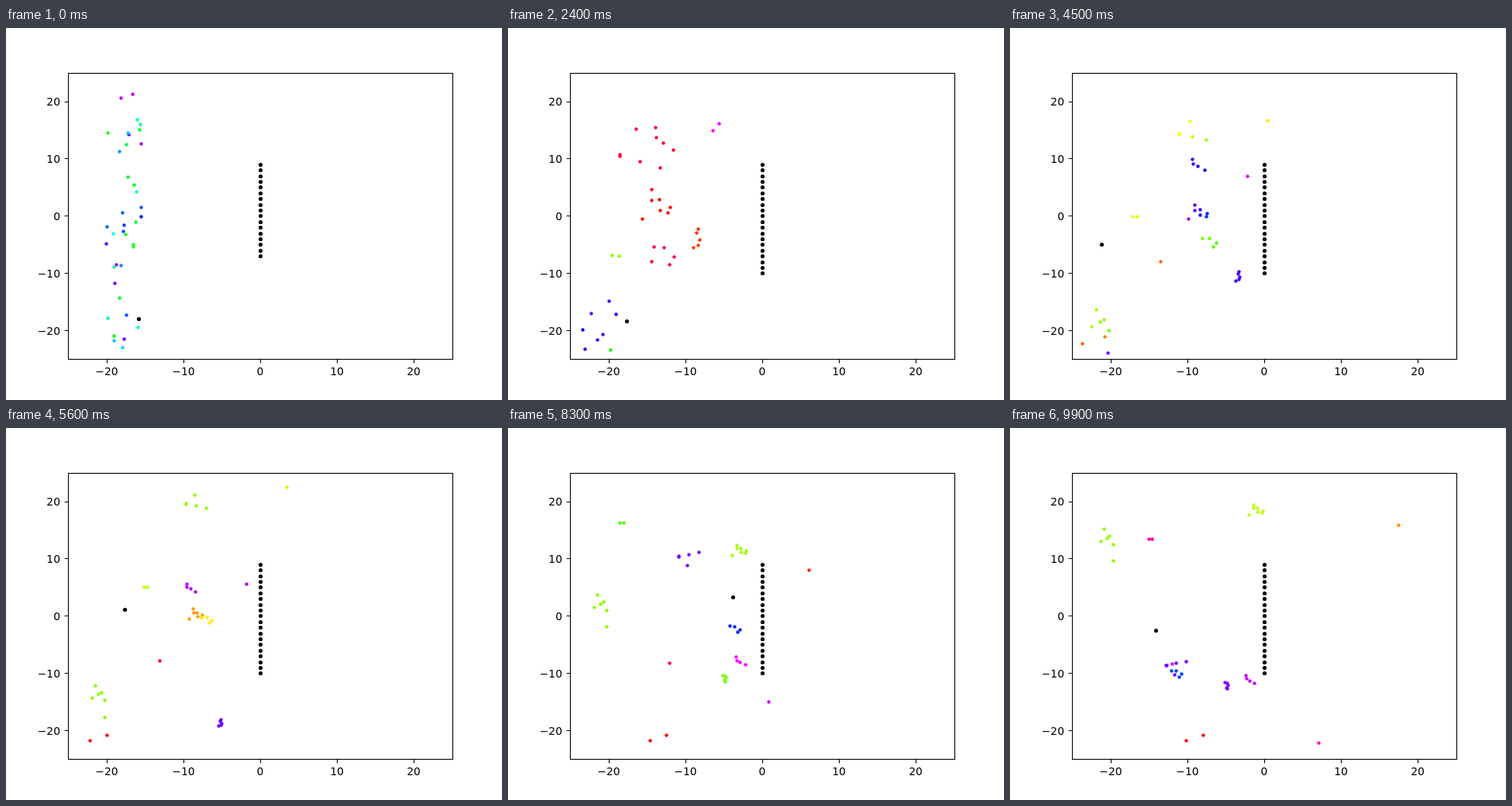
Animation, 640 px wide and 480 px high, one loop 10 s. Source, as an HTML page:

```html
<!DOCTYPE html>
<html lang="en">
<head>
<meta charset="utf-8">
<title>Flock</title>
<style>
html, body { margin: 0; width: 100%; height: 100%; overflow: hidden; background: #fff; }
svg { display: block; }
text { font: 13.89px "DejaVu Sans", sans-serif; }
.axis { fill: none; stroke: #000; stroke-width: 1.11; }
</style>
</head>
<body>
<svg id="plot" width="640" height="480" viewBox="0 0 640 480"></svg>
<script>
const plot = document.getElementById('plot');
const STEPS = 100, STEP_MS = 100, GATHER = 14, TIGHT = 56;

// Data units to pixels, centred on whole pixels
const toX = x => 328 + 9.92 * x, toY = y => 242.4 - 7.392 * y;
const snap = v => Math.round(v) + 0.5;

function add(tag, attrs, text = '') {
  const el = document.createElementNS('http://www.w3.org/2000/svg', tag);
  for (const name in attrs) el.setAttribute(name, attrs[name]);
  el.textContent = text;
  return plot.appendChild(el);
}
const dot = r => add('circle', { r });
function move(el, [x, y]) {
  el.setAttribute('cx', snap(toX(x)));
  el.setAttribute('cy', snap(toY(y)));
}

// Axes
add('rect', { class: 'axis', x: 80.5, y: 58.5, width: 496, height: 369 });
for (let v = -20; v <= 20; v += 10) {
  const x = toX(v), y = toY(v);
  const label = String(v).replace('-', '\u2212');
  add('path', { class: 'axis', d: `M${snap(x)} 427.5v4.9M80.5 ${snap(y)}h-4.9` });
  add('text', { x: Math.round(x), y: 448, 'text-anchor': 'middle' }, label);
  add('text', { x: 70, y: Math.round(y + 5.3), 'text-anchor': 'end' }, label);
}

let seed = 11;
function random() {
  seed = (seed * 16807) % 2147483647;
  return seed / 2147483647;
}
const spread = r => (random() * 2 - 1) * r;
const mix = (a, b, w) => a + (b - a) * w;
function smooth(u) {
  u = Math.min(1, Math.max(0, u));
  return u * u * (3 - 2 * u);
}
// Mirror at the walls, so a path that runs past one bounces back
function bounce(v) {
  const wall = 24, m = (((v + wall) % (4 * wall)) + 4 * wall) % (4 * wall);
  return m < 2 * wall ? m - wall : 3 * wall - m;
}

// Smooth curve through key points; a shorter list starts at a later time
const times = [0, GATHER, 34, TIGHT, 71, 83, 99];
function along(points, t) {
  const at = times.slice(-points.length), last = at.length - 1;
  t = Math.max(t, at[0]);
  let k = 0;
  while (k < last - 1 && at[k + 1] <= t) k++;
  const h = at[k + 1] - at[k], u = (t - at[k]) / h, w = smooth(u);
  return [0, 1].map(axis => {
    const slope = i => {
      const a = Math.max(0, i - 1), b = Math.min(last, i + 1);
      return (points[b][axis] - points[a][axis]) / (at[b] - at[a]);
    };
    return mix(points[k][axis], points[k + 1][axis], w)
      + h * u * (1 - u) * (slope(k) * (1 - u) - slope(k + 1) * u);
  });
}

// A flock shares one path; its birds start scattered and close up on it
const birds = [];
function flock(count, width, height, ...path) {
  for (let i = 0; i < count; i++) {
    const bird = { path, dx: spread(width), dy: spread(height), el: dot(2.2) };
    const course = (195 + spread(90)) * Math.PI / 180;
    bird.vx = 0.6 * Math.cos(course);
    bird.vy = 0.6 * Math.sin(course);
    bird.home = [-17.8 + spread(2.3), inFlock(bird, GATHER)[1] + spread(6)];
    birds.push(bird);
  }
}
function inFlock({ path, dx, dy }, t) {
  const [x, y] = along(path, t);
  const loose = path.length && dx ? mix(3.2, 1, smooth((t - GATHER) / (TIGHT - GATHER))) : 1;
  return [x + dx * Math.min(loose, 2), y + dy * loose];
}
function place(bird, t) {
  const [x, y] = inFlock(bird, t), w = smooth(t / GATHER);
  return [
    bounce(mix(bird.home[0] + bird.vx * t, x, w)),
    bounce(mix(bird.home[1] + bird.vy * t, y, w)),
  ];
}

flock(6, 1, 4, [-20.8, -20.8], [-21.3, -22], [-20.9, -13.8], [-20.9, -5], [-20.9, 2], [-20.3, 13.5]);
flock(2, 1.8, 0.8, [-18, -16], [-21.2, -21.8], [-20.4, -21.5], [-16.3, -21.5], [-12.9, -21.5], [-8.4, -21.5]);
flock(5, 0.4, 0.8, [-16, -6], [-3.6, -4.6], [-5.4, -18.8], [-5.1, -29.2], [-5.1, -37.3], [-5.1, -36]);
flock(5, 1.6, 1.4, [-21, 13], [-11.8, 11.6], [-8.4, 20], [-10.2, 30.5], [-9.6, 38], [-11.5, 57]);
flock(4, 0.9, 1, [-18.5, 15], [-9, 11.7], [-9.2, 5], [-4.8, -6], [-3, -7.8], [-2, -11]);
flock(7, 1.1, 1.2, [-19, 3], [-9, 2.5], [-8.2, 0.6], [-2.8, 7], [-2.8, 11.8], [-0.9, 18.8]);
flock(4, 0.8, 1.6, [-19, -4], [-8, -7], [-7, -0.4], [-1.6, 2.6], [-3.6, -2], [-11.5, -9.8]);
flock(2, 0.5, 0.2, [-19.5, -9], [-19, -4.7], [-15.1, 5], [-14.8, 12], [-18.5, 16.2], [-15, 13.4]);
flock(1, 0, 0, [-8.1, 20.4], [-3, 13.7], [3.4, 22.5], [3.8, 34.2], [6, 40], [17.4, 32.1]);
flock(1, 0, 0, [-15, -7.8], [-13.9, -8], [-13.1, -7.8], [-12.5, -8.2], [-12.1, -8.2], [-12, -8.4]);
flock(1, 0, 0, [-10.2, 21.7], [-3.4, 9.4], [-1.8, 5.6], [-1.6, 2.4], [0.8, -15], [7.1, -22.1]);

const barrier = Array.from({ length: 20 }, (_, i) => {
  const el = dot(2.6);
  move(el, [0, 9 - i]);
  return el;
});
const hunter = dot(2.6);
const hunt = [[-15.8, -18], [-12.9, -22.5], [-22, -12.1], [-17.6, 1.2], [-8.3, 2.6], [-3.8, 3.3], [-14.1, -2.5]];

function draw(step) {
  for (const bird of birds) {
    move(bird.el, place(bird, step));
    // The hue is the heading
    const [xa, ya] = place(bird, step - 0.1), [xb, yb] = place(bird, step + 0.1);
    const hue = Math.atan2(yb - ya, xb - xa) * 180 / Math.PI;
    bird.el.setAttribute('fill', `hsl(${(hue + 360) % 360}, 100%, 50%)`);
  }
  move(hunter, along(hunt, step));
  barrier.forEach((el, i) => el.setAttribute('visibility', i < 17 + step ? 'visible' : 'hidden'));
}

const start = performance.now();
function tick() {
  draw(Math.floor((performance.now() - start) / STEP_MS) % STEPS);
  requestAnimationFrame(tick);
}
tick();
</script>
</body>
</html>
```
